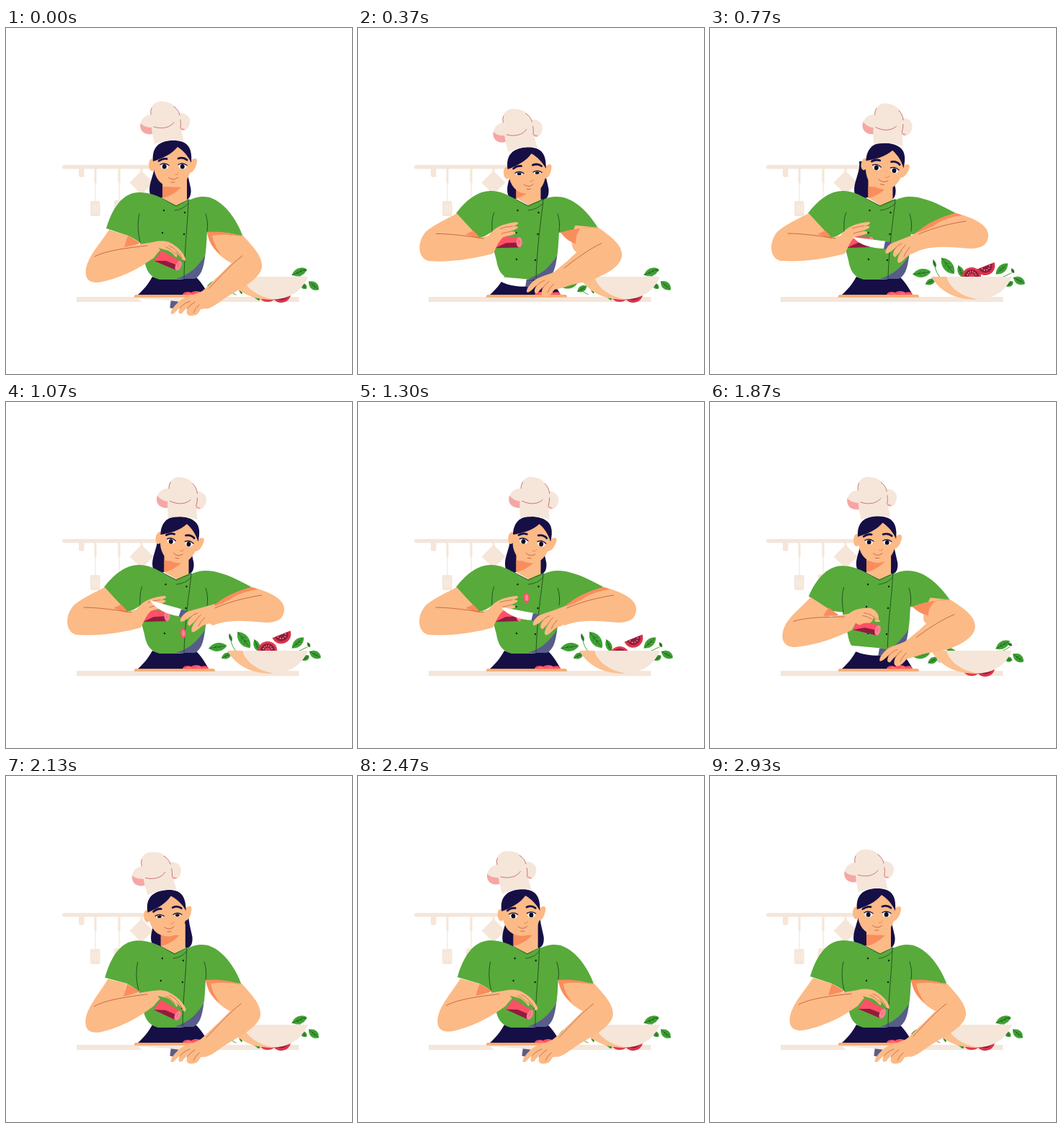
These frames come from a looping animation (480 px wide and 480 px high, 3.03 s). An HTML page:

```html
<!DOCTYPE html>
<html lang="en">
<head>
<meta charset="utf-8">
<title>Chef slicing</title>
<style>
html, body { margin: 0; width: 100%; height: 100%; overflow: hidden; background: #fff; }
svg { display: block; width: 100%; height: 100%; }
</style>
</head>
<body>
<svg id="stage" viewBox="0 0 480 480" stroke-linecap="round" stroke-linejoin="round"></svg>
<script>
const LOOP = 3030, STEP = 1000 / 30, HOLD = 2930;
const CREAM = '#f5e6d9', SKIN = '#fcba86', SHADE = '#fa8d5c', GREEN = '#58aa3b', NAVY = '#160f45',
  SLATE = '#575c8b', PINK = '#ff5166', ROSE = '#ff8290', WINE = '#8f1c3f', BLUSH = '#f6a6a4',
  FOLD = '#b9573d', LEAF = '#41a536', INK = '#1d4c1d';

// time, then values; smooth easing between rows
const HEAD = [[30, 0, 0, 0, 0], [370, 4, 9.5, -3, 0], [770, 11, 3.5, 9, 5], [1070, 9, 3, 8.5, 5],
  [1570, 10.5, 3, 8.5, 4], [2130, -7, 2, -5, 0], [2930, 0, 0, 0, 0]];
const HAIR = [[30, 0], [370, 8], [770, 1], [1070, 4], [1570, 6], [2130, 2], [2930, 0]];
const EYES = [[30, 1], [240, .9], [370, .55], [560, .7], [770, 1], [1750, 1], [2130, .55], [2500, 1]];
const LEFT = [[30, 0], [390, 1], [1620, 1], [2080, -.08], [2930, 0]];
const RIGHT = [[30, 0], [370, .36], [600, 1], [1620, 1], [2080, 0]];
const LIFT = [[340, 0], [680, 1], [1640, 1], [2020, 0]];
const SWAY = [[1620, 0], [2130, -2], [2930, 0]];
const WEDGE = [[430, 368], [700, 331], [1020, 322], [1570, 333], [1800, 368]];
const ROUND = [[430, 368], [690, 344], [1200, 344], [1480, 368]];
const CUTS = [780, 1160, 1540];

const smooth = u => { u = Math.min(1, Math.max(0, u)); return u * u * (3 - 2 * u); };
const lerp = (a, b, u) => a + (b - a) * u;

function at(rows, t) {
  let i = 0;
  while (i < rows.length - 1 && t >= rows[i + 1][0]) i++;
  const a = rows[i], b = rows[Math.min(i + 1, rows.length - 1)];
  const u = a === b ? 0 : smooth((t - a[0]) / (b[0] - a[0]));
  return a.slice(1).map((v, k) => lerp(v, b[k + 1], u));
}

function morph(low, high, u) {
  const to = high.match(/-?[\d.]+/g);
  let i = 0;
  return low.replace(/-?[\d.]+/g, n => lerp(+n, +to[i++], u).toFixed(2));
}

const fill = (d, c) => `<path d="${d}" fill="${c}"/>`;
const line = (d, c, w = .9) => `<path d="${d}" fill="none" stroke="${c}" stroke-width="${w}"/>`;
const oval = (x, y, rx, ry, c) => `<ellipse cx="${x}" cy="${y}" rx="${rx}" ry="${ry}" fill="${c}"/>`;
const box = (x, y, w, h, r, c) => `<rect x="${x}" y="${y}" width="${w}" height="${h}" rx="${r}" fill="${c}"/>`;
const group = (tf, s) => `<g transform="${tf}">${s}</g>`;
const move = (x, y, r = 0) => `translate(${x} ${y}) rotate(${r})`;

const rack = box(78, 190, 137, 5.6, 2.8, CREAM) + box(101, 193, 7.5, 14, 3, CREAM) +
  [124, 157].map((x, i) => box(x - 1.6, 194, 3.2, 21, 1, CREAM) + line(`M${x},214V241`, CREAM, 1.3) +
    box(x - 7, 240 - i, 13.5, 21 - i * 8, 2, CREAM) +
    [-3.5, 0, 3.5].map(k => line(`M${x + k - .3},${245 - i}v${11 - i * 6}`, '#fbf4ed', .9)).join('')).join('') +
  line('M188,194V200', CREAM, 3) + fill('M188,198L204.500,214.500L188,231L171.500,214.500Z', CREAM);

const table = box(98, 373, 308.500, 7, 0, CREAM);
const board = fill('M180,370H288Q290,370 290,373.800H177.500Q178,370 180,370Z', '#f9ad70') +
  fill('M245,370C246,366 252,365 257,367C262,364 268,365 271,367C276,365 281,367 281,370Z', PINK) +
  line('M252,368.500h5M265,368h5', ROSE, 1.2);

const bowl = fill('M307,345H419C411,363 396,376 370,376.500C342,377 320,367 307,345Z', CREAM) +
  fill('M307,345H328C332,360 349,373 372,376.500C343,378 320,367 307,345Z', '#fcbf8e');

// x, y, angle, length, width, then offset and turn when settled
const LEAVES = [
  [294, 340, -8, 25, 11, -2, 16, 0], [306, 352, -25, 15, 8, 5, 10, -5], [330, 330, 52, 28, 13, 12, 34, 0],
  [311.500, 327, 72, 11, 4, 14, 37, 0], [348, 338, 68, 18, 8, 0, 32, 0], [405, 334, -42, 22, 10, 2, 4.500, 20],
  [429, 350.500, 28, 18, 10, -2, 7, 12], [416, 355, -35, 11, 7, -3, 3, 75], [420, 337, 65, 7, 4, -6, -1, -60]];

function leaf([x, y, a, l, w, dx, dy, turn], lift) {
  const h = l / 2, d = 1 - lift;
  return group(move(x + dx * d, y + dy * d, a + turn * d),
    fill(`M${-h},0C${-h / 2},${-w * .7} ${h / 2},${-w * .7} ${h},0C${h / 2},${w * .7} ${-h / 2},${w * .7} ${-h},0Z`, LEAF) +
    line(`M${-h},0H${h * .75}`, INK, .7) +
    [-.35, .1].map(k => line(`M${h * k},0l${w * .3},${-w * .3}M${h * k},0l${w * .3},${w * .3}`, INK, .4)).join(''));
}

function salad(t) {
  const [lift] = at(LIFT, t), [wy] = at(WEDGE, t), [ry] = at(ROUND, t);
  const seeds = n => [...Array(n)].map((_, i) => {
    const a = Math.PI * (i + .5) / n;
    return oval((Math.cos(a) * 6).toFixed(1), (Math.sin(a) * 6).toFixed(1), .8, .8, '#ffc2b8');
  }).join('');
  const round = group(move(363, ry, 180), oval(0, 0, 13, 12, '#e2394d') + oval(0, 0, 10, 9, WINE) +
    oval(0, 0, 4, 3.500, '#e2394d') + seeds(6));
  const wedge = group(move(382, wy, -22), fill('M-13.500,0H13.500C13,8 7,13 0,13C-7,13 -13,8 -13.500,0Z', '#dc3349') +
    fill('M-10,.5H10C9,6 5,9.500 0,9.500C-5,9.500 -9,6 -10,.5Z', WINE) + seeds(5));
  const stems = line(`M312,${lerp(366, 332, lift)}Q314,${lerp(368, 340, lift)} 319,${lerp(370, 346, lift)}`, LEAF, 1) +
    line(`M405,346L${lerp(414, 418, lift)},340`, LEAF, 1);
  return LEAVES.map(v => leaf(v, lift)).join('') + stems + round + wedge + bowl;
}

const backHair = fill('M206,185C208,202 196,215 200,231C203,239 212,237 217,235L248,238C255,240 258,229 256,221C254,210 251,205 251,185Z', NAVY);
const neck = fill('M217,205V236L236,247L251,238V205Z', SKIN) + fill('M217,220L243,221C235,229 226,234 217,236Z', SHADE);

function eye(x, open) {
  return group(`translate(${x} 192) scale(1 ${open.toFixed(2)})`, oval(0, 0, 5.500, 3.800, '#fff') + oval(-.3, .3, 3, 3.300, '#0c0b20')) +
    line(`M${x - 6},${192.500 - 3 * open}q6,-3.500 12,1`, NAVY, 1.3);
}

const face = oval(202.500, 190, 4.500, 8.500, SKIN) + fill('M254,187C258,180 266,179 265,185C264,193 260,201 254,201Z', SKIN) +
  fill('M204,176C203,198 208,211 218,217C228,222 240,222 248,214C255,206 258,195 257,176L238,160Z', SKIN) +
  fill('M204,185C202,165 213,156 232,156C251,156 259,165 257,187C253,178 246,170 238,165C230,175 217,181 204,185Z', NAVY) +
  line('M212,184.500Q217,180.500 223,181.500M239,181Q246,178.500 251,183', NAVY, 2.800) +
  line('M234,203Q238,205 239,201', '#ed8052') + line('M225.500,207.500Q232,213 238.500,207.500M229,214h5', '#c9624b');

const hat = fill('M206,161L203,147C191,149 184,139 187,131C190,123 195,121 201,120C199,106 209,101 217,102C229,102 237,109 240,118C250,117 256,124 255,131C254,140 248,144 243,141L246.500,157C233,154 218,156 206,161Z', CREAM) +
  fill('M186.500,132C185,143 192,149 203,147L202,138C196,138 190,136 186.500,132Z', BLUSH) +
  fill('M241,138Q243,144 249,141Q246,139 241,138Z', BLUSH) +
  line('M205,137C217,141 228,138 233,131M201,120Q200,115 202,111M233,109Q240,114 241,121M242,127Q243,133 242,138', '#c65b68', .8);

function head(t) {
  const [x, y, r, hx] = at(HEAD, t), [open] = at(EYES, t);
  return group(`translate(${x} ${y}) rotate(${r} 232 192)`,
    face + eye(220, open) + eye(245, open) + group(`translate(${hx} 0)`, hat));
}

const apron = fill('M203,345C215,350 250,350 263,345C270,351 276,361 281,370H183C190,364 197,356 203,345Z', NAVY);

function shirt(l, r) {
  const top = 2.500 * l;
  const dots = [[219, 253, top], [248, 256, top], [217, 284, top], [247, 286, top], [220, 321, 0], [246, 322, 0]];
  return fill('M184,230L215,236L236,246L254,238L272,240L279,283C278,298 278,306 276,318C272,333 258,345 240,349H213C200,346 194,336 192,322C189,310 185,298 184,285Z', GREEN) +
    fill('M276,316C274,338 268,345 262,348H236C254,342 265,333 276,316Z', SLATE) +
    fill(morph('M139,278C147,252 160,229 184,228C198,228 208,232 216,236L200,300L186,298C181,294 175,291 169,288Z',
      'M136,257C148,241 165,226 184,226C198,226 208,232 216,236L200,290L186,282C180,287 174,290 168,291Z', l), GREEN) +
    fill(morph('M252,240C265,233 277,233 285,236C306,244 322,270 329,290C316,284 298,283 279,283L255,285Z',
      'M255,240C268,232 284,233 296,237C312,241 328,250 341,257C322,262 300,271 285,286L255,287Z', r), GREEN) +
    line(morph('M185,258C182,271 183,284 186,297', 'M189,256C185,264 186,275 186,284', l), INK) +
    line('M277,258Q281,270 279,282', INK) +
    line(morph('M253,238C252,275 248,300 247,347', 'M257,238C256,255 249,290 247,347', l), INK) +
    line(morph('M216,236L236,247L253,238M234,253Q246,252 253,243', 'M216,236L236,247L257,238M236,253Q249,252 257,243', l), INK, .8) +
    dots.map(([x, y, dx]) => oval(x + dx, y, 1.200, 1.200, '#102410')).join('');
}

const sausage = fill('M0,-8L31,-6V8L-3,9Z', PINK) + fill('M-3,9L12,2L31,1V8Z', WINE) + oval(30.500, 1, 4, 7.200, ROSE) +
  line('M30,-2v5', '#e8596c', .8);

function leftArm(l) {
  return fill(morph('M143,280C130,300 115,315 111,333C108,352 120,356 138,351C165,344 185,333 205,319C209,314 211,311 214,308L205,297L166,303L169,288Z',
      'M137,257C120,266 102,274 93,283C80,300 84,320 98,323C130,325 160,320 187,313C190,305 191,299 193,292L181,288L168,291L168,291Z', l), SKIN) +
    fill(morph('M169,288L186,298L183,300L164,304Z', 'M160,281L169,291L167,292L149,286Z', l), SHADE) +
    line(morph('M123,317C140,308 170,305 196,302', 'M108,285C125,285 150,288 174,292', l), FOLD, .8) +
    group(move(lerp(212, 193, l), lerp(316, 296, l), lerp(25, 0, l)), sausage) +
    fill(morph('M196,301C203,296 215,294 226,297C237,302 246,311 249,320C249,324 246,324 244,320C239,314 236,311 234,309C237,313 239,317 236,318C232,314 228,309 222,308C218,308 213,310 205,318Z',
      'M177,296C184,280 194,272 220,269C224,270 222,273 213,275C225,273 225,278 209,282C216,281 220,283 218,285C212,288 206,288 201,290C196,294 192,302 188,312Z', l), SKIN) +
    line(morph('M226,302Q238,307 244,319', 'M197,278Q206,275 214,274.500', l), FOLD, .7) +
    line(morph('M222,304Q230,307 235,314', 'M199,285Q205,283 211,282', l), FOLD, .7);
}

const knife = fill('M0,-5L-47,-11C-38,0 -20,5 -3,5Z', '#fff') + fill('M-2,-5L8,-3L6,8L-4,5Z', SLATE);

function rightArm(r, up, sway) {
  const arm = fill(morph('M329,288C342,303 356,316 355,332C352,350 322,363 305,374C295,381 288,387 278,390L264,369C275,366 285,352 296,343C303,336 308,331 313,326C296,318 283,303 279,283Z',
      'M341,257C362,262 386,272 386,287C386,302 375,306 360,306C335,304 310,301 287,310L262,296C270,293 277,289 283,286C284,285 285,285 286,284C288,282 320,262 341,257Z', r), SKIN) +
    fill(morph('M279,283C298,282 316,284 329,290C314,286 300,286 286,288C288,298 292,306 298,314C287,307 281,296 279,283Z',
      'M285,285C300,271 322,261 341,257C346,258 348,259 349,260C330,263 318,268 311,274C303,278 296,281 285,285Z', r), SHADE) +
    line(morph('M328,316C313,327 300,342 277,366', 'M355,268C335,271 312,276 287,287', r), FOLD, .8);
  const hand = fill(morph('M284,360C272,367 252,371 243,377C234,384 227,393 229,397C233,398 238,390 242,387C238,393 239,398 244,396C247,392 249,390 252,388C249,395 251,400 258,399C266,399 268,394 270,390C276,390 281,388 287,384Z',
      'M289,284C272,291 258,296 251,299C246,303 242,309 244,313C248,313 254,308 258,304C254,311 252,316 257,318C260,314 264,311 266,308C261,316 258,324 262,326C267,325 272,317 278,314C282,313 285,311 291,308Z', r), SKIN) +
    line(morph('M255,379Q246,382 241,389M262,380Q254,385 251,390M268,384Q262,389 260,395',
      'M266,299Q260,301 256,307M271,301Q267,305 264,311M277,304Q271,311 269,317', r), FOLD, .7);
  const blade = group(move(lerp(231, 245, r), lerp(383, 301, r), lerp(-4, 0, r) + 3 * up), knife);
  return group(`rotate(${5.500 * up} 330 290)`, blade) + group(`translate(${sway} 0)`, arm) +
    group(`rotate(${5.500 * up} 330 290)`, hand);
}

function raise(t) {
  if (t < 600 || t > 1560) return 0;
  const p = ((t - CUTS[0]) / 380 + 1) % 1;
  return p < .78 ? smooth((p - .12) / .6) : 1 - smooth((p - .78) / .17);
}

function slices(t) {
  return CUTS.map(c => {
    const u = t - c, y = 290 - .36 * u + .00163 * u * u;
    return u > 0 && y < 366 ? group(move(222 + .083 * u, y, -4), oval(0, 0, 4.200, 7, PINK) + oval(.3, 0, 2.400, 4.600, ROSE)) : '';
  }).join('');
}

const stage = document.getElementById('stage');

function draw(time) {
  const t = Math.min(HOLD, Math.floor((time % LOOP) / STEP) * STEP);
  const [l] = at(LEFT, t), [r] = at(RIGHT, t), [sway] = at(SWAY, t), [hx] = at(HAIR, t);
  const shift = `translate(${sway} 0)`;
  stage.innerHTML = rack + group(`translate(${hx} 0)`, backHair) + apron +
    group(shift, group(`translate(${2.500 * l} 0)`, neck) + shirt(l, r)) + head(t) +
    table + board + salad(t) + group(shift, leftArm(l)) + slices(t) + rightArm(r, raise(t), sway);
}

const start = performance.now();
function tick() {
  draw(performance.now() - start);
  requestAnimationFrame(tick);
}
tick();
</script>
</body>
</html>
```
